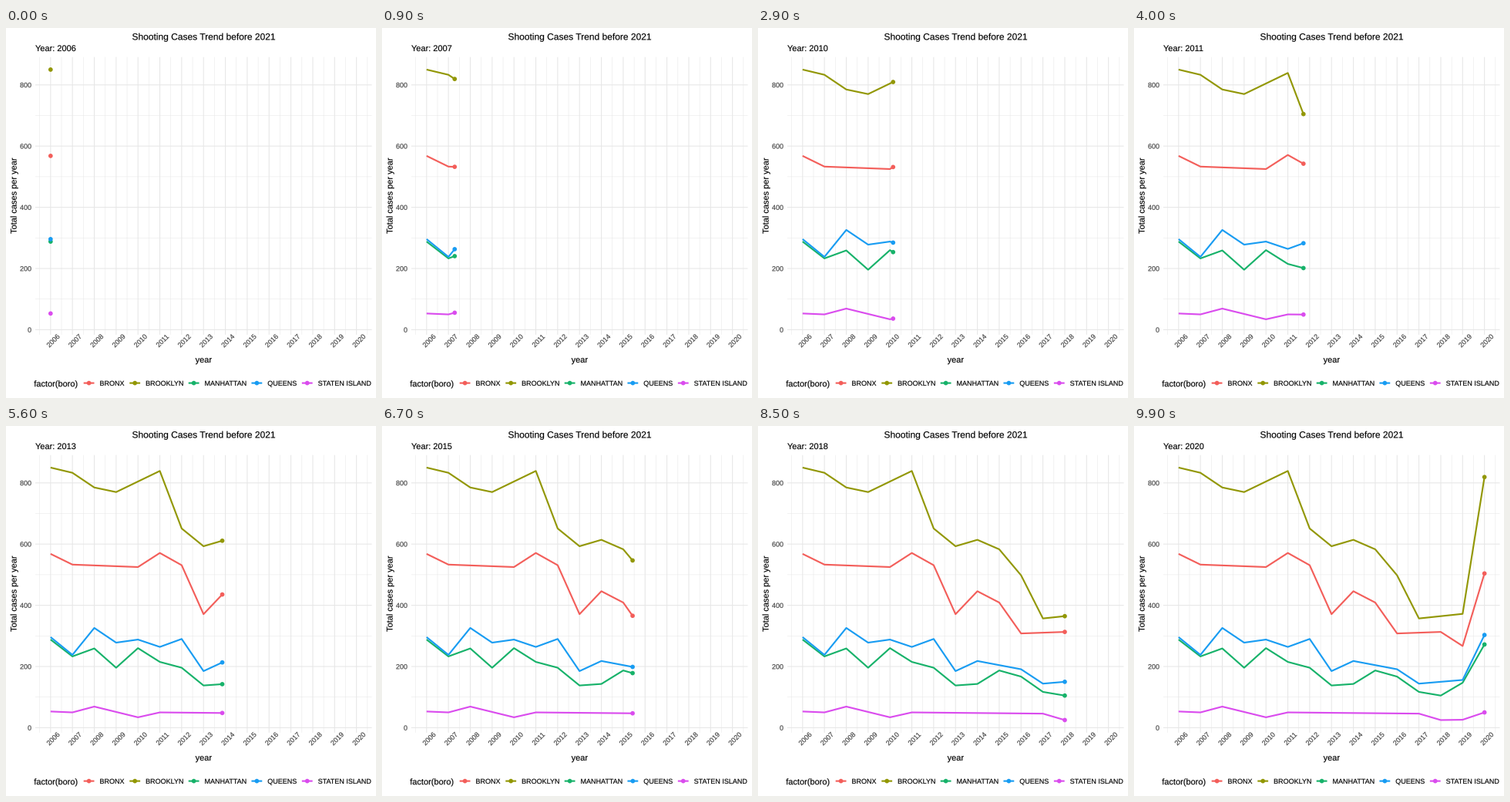
Recreate the animation shown at these times as a matplotlib script. Size 480 by 480 pixels, loop 10000 ms.

```python
import matplotlib.pyplot as plt
import numpy as np
from matplotlib.animation import FuncAnimation
from matplotlib.patches import Circle, PathPatch
from matplotlib.textpath import TextPath
from matplotlib.transforms import Affine2D

plt.rcParams["font.family"] = "Liberation Sans"

SIZE, DPI = 480, 72
FRAMES, INTERVAL = 100, 100
FIRST, LAST = 2006, 2020
YEARS = np.arange(FIRST, LAST + 1)
LEFT, RIGHT, TOP, BOTTOM = 38.0, 474.5, 37.7, 397.9
GRID, TICK = "#e7e7e7", "#414141"
LINE_W, RADIUS = 2.13, 2.85

# Yearly totals at the turning points; straight runs between them are left out.
RUN = np.nan
SERIES = {
    "BRONX": ("#f35e5a", [568, 533, RUN, RUN, 525, 571, 531, 371, 446, 409,
                          308, RUN, 313, 267, 504]),
    "BROOKLYN": ("#929705", [850, 833, 785, 770, RUN, 839, 651, 593, 614, 583,
                             498, 357, RUN, 372, 819]),
    "MANHATTAN": ("#17b26a", [288, 233, 259, 196, 260, 215, 196, 138, 143, 187,
                              167, 117, 105, 147, 272]),
    "QUEENS": ("#189cf2", [296, 238, 326, 278, 288, 264, 290, 185, 218, RUN,
                           191, 144, RUN, 156, 303]),
    "STATEN ISLAND": ("#da4cee", [53, 50, 69, RUN, 34, 50, RUN, RUN, RUN, RUN,
                                  RUN, 46, 25, 26, 50]),
}


def px(year):
    return LEFT + (np.asarray(year) - FIRST + 0.7) * (RIGHT - LEFT) / 15.4


def py(cases):
    return 391.4 - np.asarray(cases) * 0.397


def fill_runs(totals):
    totals = np.array(totals, float)
    known = ~np.isnan(totals)
    return np.interp(YEARS, YEARS[known], totals[known])


fig = plt.figure(figsize=(SIZE / DPI, SIZE / DPI), dpi=DPI, facecolor="white")
ax = fig.add_axes([0, 0, 1, 1])
ax.set(xlim=(0, SIZE), ylim=(SIZE, 0))
ax.axis("off")


def stroke(xs, ys, color, width, z):
    return ax.plot(xs, ys, color=color, lw=width, zorder=z, snap=False,
                   solid_capstyle="butt", solid_joinstyle="round")[0]


def dot(x, y, color, z):
    return ax.add_patch(Circle((x, y), RADIUS, fc=color, lw=0, zorder=z))


def label(x, y, text, size, color="black", align=0, angle=0):
    """Place text on its baseline; align runs from 0 (left) to 1 (right)."""
    path = TextPath((0, 0), text, size=size)
    move = (Affine2D().translate(-align * path.get_extents().x1, 0)
            .scale(1, -1).rotate_deg(-angle).translate(x, y))
    return ax.add_patch(PathPatch(path, fc=color, ec=color, lw=0.15, snap=False,
                                  zorder=3, transform=move + ax.transData))


def draw_grid():
    for year in np.arange(FIRST - 0.5, LAST + 1):
        stroke([px(year)] * 2, [TOP, BOTTOM], GRID, 0.53, 1)
    for cases in range(100, 800, 200):
        stroke([LEFT, RIGHT], [py(cases)] * 2, GRID, 0.53, 1)
    for year in YEARS:
        stroke([px(year)] * 2, [TOP, BOTTOM], GRID, 1.07, 2)
        label(px(year) + 5.3, 408, str(year), 9, TICK, 0.5, 45)
    for cases in range(0, 801, 200):
        stroke([LEFT, RIGHT], [py(cases)] * 2, GRID, 1.07, 2)
        label(32.7, py(cases) + 3.3, str(cases), 9, TICK, 1)


def draw_legend(x=107.6, y=460.6, gap=13.9):
    label(36.3, y + 4.6, "factor(boro)", 11)
    for name, (color, _) in SERIES.items():
        stroke([x - 6.9, x + 6.9], [y] * 2, color, LINE_W, 3)
        dot(x, y, color, 4)
        text = label(x + gap, y + 3.4, name, 9)
        x += 2 * gap + text.get_path().get_extents().x1


draw_grid()
draw_legend()
mid_x = (LEFT + RIGHT) / 2
label(mid_x, 15.4, "Shooting Cases Trend before 2021", 12, align=0.5)
label(mid_x, 434, "year", 11, align=0.5)
label(13.6, (TOP + BOTTOM) / 2, "Total cases per year", 11, align=0.5, angle=90)
subtitle = label(LEFT, 30, f"Year: {FIRST}", 11)

totals = [fill_runs(values) for _, values in SERIES.values()]
lines = [stroke([], [], color, LINE_W, 5) for color, _ in SERIES.values()]
dots = [dot(0, 0, color, 6) for color, _ in SERIES.values()]

# Each year is reached on a whole frame.
KEYS = np.rint((YEARS - FIRST) * (FRAMES - 1) / (LAST - FIRST))


def update(i):
    now = np.interp(i, KEYS, YEARS)
    past = YEARS < now
    xs = px(np.append(YEARS[past], now))
    for line, head, values in zip(lines, dots, totals):
        ys = py(np.append(values[past], np.interp(now, YEARS, values)))
        line.set_data(xs, ys)
        head.center = xs[-1], ys[-1]
    year = FIRST + i * (LAST - FIRST) // (FRAMES - 1)
    subtitle.set_path(TextPath((0, 0), f"Year: {year}", size=11))
    return [*lines, *dots, subtitle]


anim = FuncAnimation(fig, update, frames=FRAMES, interval=INTERVAL,
                     repeat=True, repeat_delay=0)
plt.show()
```
